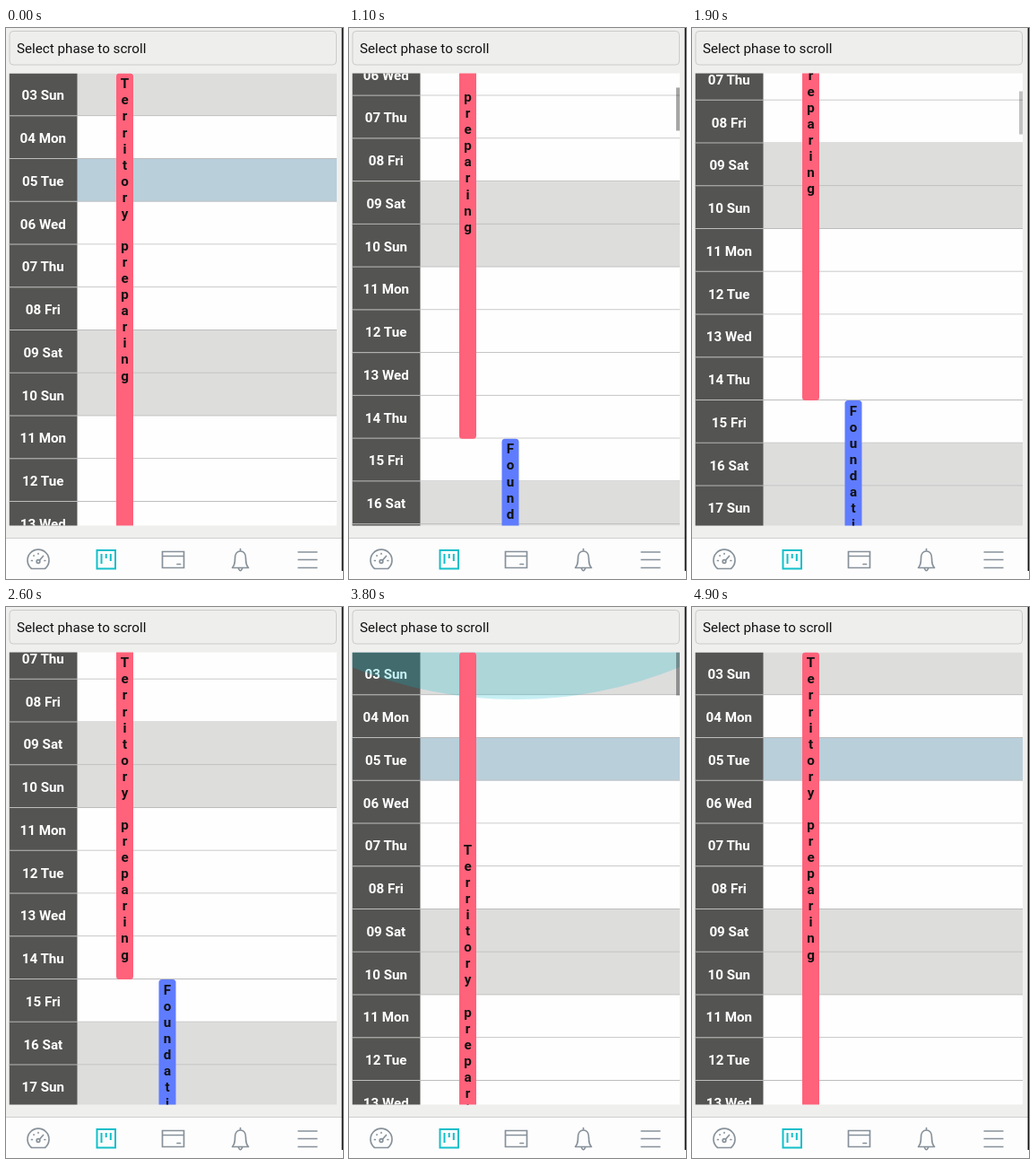
Recreate the animation shown at these times as an HTML page. Size 376x614 px, loop 6 s.

```html
<!DOCTYPE html>
<html lang="en">
<head>
<meta charset="utf-8">
<title>Phase schedule</title>
<style>
  html, body { margin: 0; width: 100%; height: 100%; overflow: hidden; background: #efefee; }
  svg { display: block; }
  text { font: 15.2px Roboto, sans-serif; }
  .day { font-weight: 700; fill: #fff; text-anchor: middle; }
  .label { font-weight: 700; fill: #111; text-anchor: middle; }
  .icon { fill: none; stroke: #87919a; stroke-width: 1.7; stroke-linecap: round; stroke-linejoin: round; }
</style>
</head>
<body>
<svg width="376" height="614" viewBox="0 0 376 614">
  <clipPath id="view"><rect x="3.5" y="50.5" width="365.5" height="504"/></clipPath>
  <rect width="376" height="614" fill="#efefee"/>
  <rect x="4" y="3.5" width="364.5" height="37.5" rx="4" fill="#eeeeed" stroke="#cbcbcb"/>
  <text x="12" y="28.3" fill="#111">Select phase to scroll</text>

  <g clip-path="url(#view)">
    <g id="rows"></g>
    <circle id="glow" cx="186" r="483" fill="#00bccc"/>
    <g id="bars"></g>
    <rect id="thumb" x="365" width="4" height="48"/>
  </g>

  <rect y="568" width="376" height="46" fill="#fdfdfd"/>
  <path d="M0 568.5H376" stroke="#cfcfcf"/>
  <rect x="374.6" width="1.4" height="605" fill="#111"/>

  <g class="icon">
    <path d="M28.5 602.5A12 12 0 1 1 43.5 602.5Z"/>
    <circle cx="36" cy="594.5" r="1.8"/>
    <path d="M37.5 593L41.5 588.5M28.5 593.5h.8M30.8 588h.6M36 585.5v.6M43 593.5h.8"/>
    <path d="M174.5 583.5H198.5V601.5H174.5ZM174.5 588.5H198.5M191 597.5H194.5" stroke-linejoin="miter"/>
    <path d="M252.5 601.5H270.5C268 599 267.5 597 267.5 591C267.5 586 265 583 261.5 583S255.500 586 255.500 591C255.500 597 255 599 252.500 601.500ZM261.500 580.500V583M259.500 602.500Q261.500 607 263.500 602.500"/>
    <path d="M325.500 584H347.500M325.500 592.500H347.500M325.500 601.500H347.500" stroke-linecap="butt"/>
  </g>
  <g fill="none" stroke="#12bfc9" stroke-width="2">
    <rect x="101.500" y="582" width="20.500" height="20.500"/>
    <path d="M106.500 586V597M111.700 586V591M116.800 586V594"/>
  </g>
</svg>
<script>
const $ = id => document.getElementById(id);
const TOP = 50.5, ROW = 47.75, REACH = 208.5;
const clamp = x => Math.min(1, Math.max(0, x));
const smooth = x => (x = clamp(x)) * x * (3 - 2 * x);
const days = ["Sun", "Mon", "Tue", "Wed", "Thu", "Fri", "Sat"];

function row(i) {
  const y = TOP + i * ROW, name = days[i % 7];
  const fill = i === 2 ? "#b9cfda" : name[0] === "S" ? "#dddddc" : "#fefefe";
  return `<rect x="3.5" y="${y}" width="366" height="${ROW + .5}" fill="${fill}"/>
    <rect x="3.5" y="${y}" width="76" height="${ROW + .5}" fill="#545452"/>
    <path d="M3.5 ${y + ROW - .5}H369" stroke="#bdbdbd"/>
    <text class="day" x="41.3" y="${y + 29.8}">${String(i + 3).padStart(2, "0")} ${name}</text>`;
}

function bar(id, x, first, count, fill, label) {
  const y = TOP + first * ROW;
  const letters = [...label].map((c, i) =>
    `<text class="label" x="${x + 9.5}" y="${y + 16.8 + i * 18.07}">${c}</text>`).join("");
  return `<rect x="${x}" y="${y}" width="19" height="${count * ROW}" rx="3.5" fill="${fill}"/>
    <g id="${id}">${letters}</g>`;
}

$("rows").innerHTML = Array.from({ length: 16 }, (_, i) => row(i)).join("");
$("bars").innerHTML = bar("prep", 123, 0, 12, "#ff627b", "Territory preparing")
  + bar("base", 170.5, 12, 8, "#5f7cff", "Foundation");

const shift = (id, y) => $(id).setAttribute("transform", `translate(0 ${y})`);

function draw(t) {
  const down = 1 - (1 - clamp((t - 821) / 679)) ** 3;
  const scroll = REACH * (down - smooth((t - 3400) / 400));
  shift("rows", -scroll);
  shift("bars", -scroll);

  // the label follows the visible top of its bar once scrolling rests
  shift("prep", REACH * (smooth((t - 2200) / 400) - smooth((t - 4600) / 300)));

  const glow = t < 3800 ? 0 : 1 - smooth((t - 3800) / 450);
  $("glow").setAttribute("cy", TOP + 52.5 * glow - 483);
  $("glow").setAttribute("opacity", .22 * Math.sqrt(glow));

  const fade = t < 900 ? 0 : t < 3500 ? clamp((2100 - t) / 300) : clamp((4400 - t) / 300);
  $("thumb").setAttribute("y", TOP + scroll * .096);
  $("thumb").setAttribute("opacity", .35 * fade);
}

// the screen refreshes ten times a second
function tick() {
  draw(Math.floor(performance.now() % 6000 / 100) * 100);
  requestAnimationFrame(tick);
}
tick();
</script>
</body>
</html>
```
